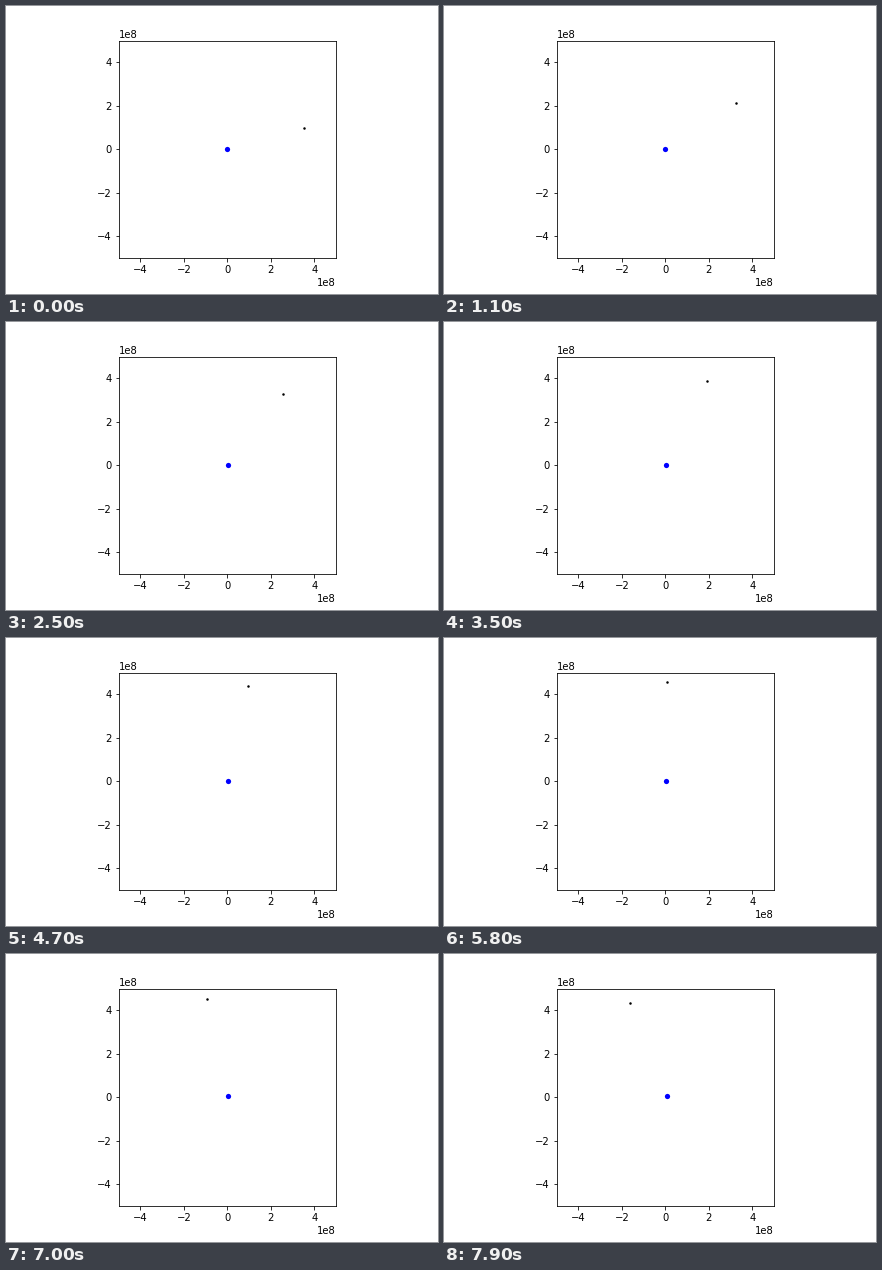
Recreate the animation shown at these times as a matplotlib script. Size 432 px wide and 288 px high, loop 8000 ms.

```python
import numpy as np
import matplotlib.pyplot as plt
from matplotlib.animation import FuncAnimation

FRAMES = 80
STEP = 10_000          # simulated seconds per frame
SUBSTEPS = 20
G = 6.674e-11
MASS = np.array([6.0e24, 7.35e22])
LIMIT = 5e8

plt.rcParams.update({
    "font.family": "DejaVu Sans",
    "font.size": 10,
    "figure.subplot.bottom": 0.125,
})


def acceleration(pos):
    gap = pos[1] - pos[0]
    pull = G * gap / np.linalg.norm(gap) ** 3
    return np.array([pull * MASS[1], -pull * MASS[0]])


def simulate():
    """Leapfrog integration of the planet and its moon."""
    pos = np.array([[0.0, 0.0], [3.5e8, 1.0e8]])
    vel = np.array([[0.0, 0.0], [-74.0, 1073.0]])
    h = STEP / SUBSTEPS
    track = [pos.copy()]
    for _ in range(FRAMES - 1):
        for _ in range(SUBSTEPS):
            vel += acceleration(pos) * h / 2
            pos += vel * h
            vel += acceleration(pos) * h / 2
        track.append(pos.copy())
    return np.array(track)


track = simulate()

fig, ax = plt.subplots(figsize=(6, 4), dpi=72)
ax.set_aspect("equal")
ax.set_xlim(-LIMIT, LIMIT)
ax.set_ylim(-LIMIT, LIMIT)


def body(start, diameter, color):
    return ax.scatter(*start, s=diameter ** 2, c=color, linewidths=0, zorder=3)


bodies = [body(track[0, 0], 5.25, "blue"), body(track[0, 1], 2.5, "black")]


def update(i):
    for dot, pos in zip(bodies, track[i]):
        dot.set_offsets([pos])
    return bodies


anim = FuncAnimation(fig, update, frames=FRAMES, interval=100,
                     repeat=True, repeat_delay=0, blit=False)
plt.show()
```
